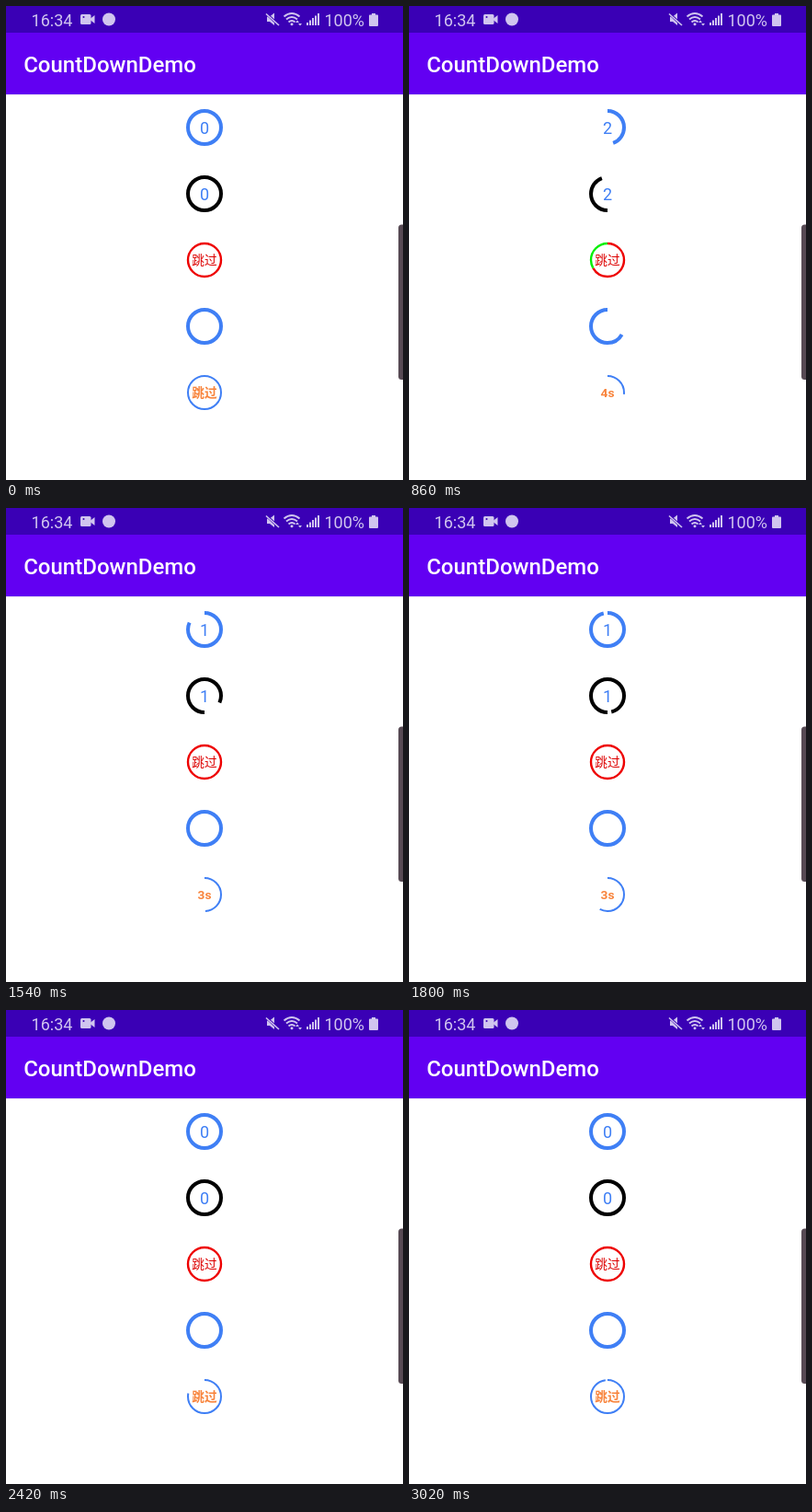
Animation, 432 px wide and 515 px high, one loop 3.04 s. Source, as an HTML page:

```html
<!DOCTYPE html>
<html lang="en">
<head>
<meta charset="utf-8">
<title>CountDownDemo</title>
<style>
  html, body { margin: 0; width: 100%; height: 100%; overflow: hidden; background: #fff; }
  svg { display: block; width: 432px; height: 515px; }
  text { font-family: Roboto, "Noto Sans CJK SC", "Noto Sans CJK", "Noto Sans CJK JP", sans-serif; }
  .status { fill: #d0c5ef; }
  .line { fill: none; stroke: #d0c5ef; }
</style>
</head>
<body>
<svg viewBox="0 0 432 515">
  <rect width="432" height="515" fill="#fff"/>
  <rect y="96" width="432" height="1" fill="#f0eef4"/>
  <rect width="432" height="96" fill="#6200f2"/>
  <rect width="432" height="29" fill="#3a00b5"/>

  <g class="status">
    <text x="27.6" y="21.5" font-size="18">16:34</text>
    <rect x="81" y="9" width="11.5" height="11" rx="1.5"/>
    <path d="M92 13.5L96.5 10V19L92 15.5Z"/>
    <circle cx="84.5" cy="12" r="1" fill="#3a00b5"/>
    <circle cx="112" cy="14.5" r="7"/>
    <path d="M284 11.5H287L292 7.5V21L287 17H284Z"/>
    <path d="M283 8L297 21" stroke="#3a00b5" stroke-width="3"/>
    <path class="line" d="M283 8.5L297 21" stroke-width="1.6"/>
    <path class="line" stroke-width="1.9"
      d="M302.5 11.5Q311 4.5 319.5 11.5M305 14.5Q311 9.5 317 14.5M307.5 17.5Q311 14.5 314.5 17.5"/>
    <circle cx="311" cy="19.8" r="1.5"/>
    <path d="M315 18L317 15.5L319 18ZM318 19L320 21.5L322 19Z"/>
    <path d="M327 18h2v3h-2zM330 15.5h2v5.5h-2zM333 13h2v8h-2zM336 10.5h2v10.5h-2zM339 8h2v13h-2z"/>
    <text x="346.5" y="21.5" font-size="18">100%</text>
    <path d="M398 8h4v1.5h2q1 0 1 1V21q0 1-1 1h-8q-1 0-1-1V10.5q0-1 1-1h2z"/>
  </g>
  <text x="19.2" y="71.5" font-size="24" font-weight="500" fill="#fff">CountDownDemo</text>

  <g id="rings"></g>
  <path d="M432 237.500H430.500Q427 237.500 427 241V402.500Q427 406 430.500 406H432Z" fill="#574a54"/>
</svg>
<script>
const LOOP = 3040, START = 53, SECOND = 606;
const BLUE = '#3f7ff5', RED = '#ee0000', SKIP = '跳过';

const digit = left => String(Math.ceil(left));
const timers = [
  { y: 132, seconds: 3, color: BLUE, width: 4, label: digit, size: 18, ink: BLUE },
  { y: 204, seconds: 3, color: '#000', width: 4, from: 90, label: digit, size: 18, ink: BLUE },
  { y: 276, seconds: 2, color: RED, width: 2.4, track: '#00f000', label: () => SKIP, size: 13.7, ink: '#dd0000' },
  { y: 348, seconds: 2, color: BLUE, width: 4, reverse: true },
  { y: 420, seconds: 5, color: BLUE, width: 2, size: 13.7, ink: '#f8843c', weight: 700,
    label: left => left > 2 ? Math.ceil(left) + 's' : SKIP }
];

function add(parent, tag, attrs) {
  const node = document.createElementNS('http://www.w3.org/2000/svg', tag);
  for (const key in attrs) node.setAttribute(key, attrs[key]);
  return parent.appendChild(node);
}

for (const timer of timers) {
  const group = add(document.getElementById('rings'), 'g', { transform: `translate(216 ${timer.y})` });
  const ring = color => add(group, 'path', {
    d: 'M18 0A18 18 0 0 1 -18 0A18 18 0 0 1 18 0', pathLength: 360, fill: 'none',
    stroke: color, 'stroke-width': timer.width,
    transform: `rotate(${timer.from ?? -90}) scale(1 ${timer.reverse ? -1 : 1})`
  });
  if (timer.track) timer.rest = ring(timer.track);
  timer.arc = ring(timer.color);
  if (timer.label) timer.text = add(group, 'text', {
    y: timer.size * .385, 'text-anchor': 'middle', fill: timer.ink,
    'font-size': timer.size, 'font-weight': timer.weight || 400
  });
}

function draw(time) {
  for (const timer of timers) {
    // Every ring rests in its finished state until the countdown starts.
    const elapsed = time < START ? timer.seconds : (time - START) / SECOND;
    const progress = Math.min(1, elapsed / timer.seconds);
    const sweep = 360 * progress;
    timer.arc.setAttribute('stroke-dasharray', progress < 1 ? `${sweep} 720` : 'none');
    if (timer.rest) timer.rest.setAttribute('stroke-dasharray', `0 ${sweep} ${360 - sweep} 720`);
    if (timer.text) timer.text.textContent = timer.label(timer.seconds * (1 - progress));
  }
}

const begin = performance.now();
function tick() {
  draw((performance.now() - begin) % LOOP);
  requestAnimationFrame(tick);
}
tick();
</script>
</body>
</html>
```
